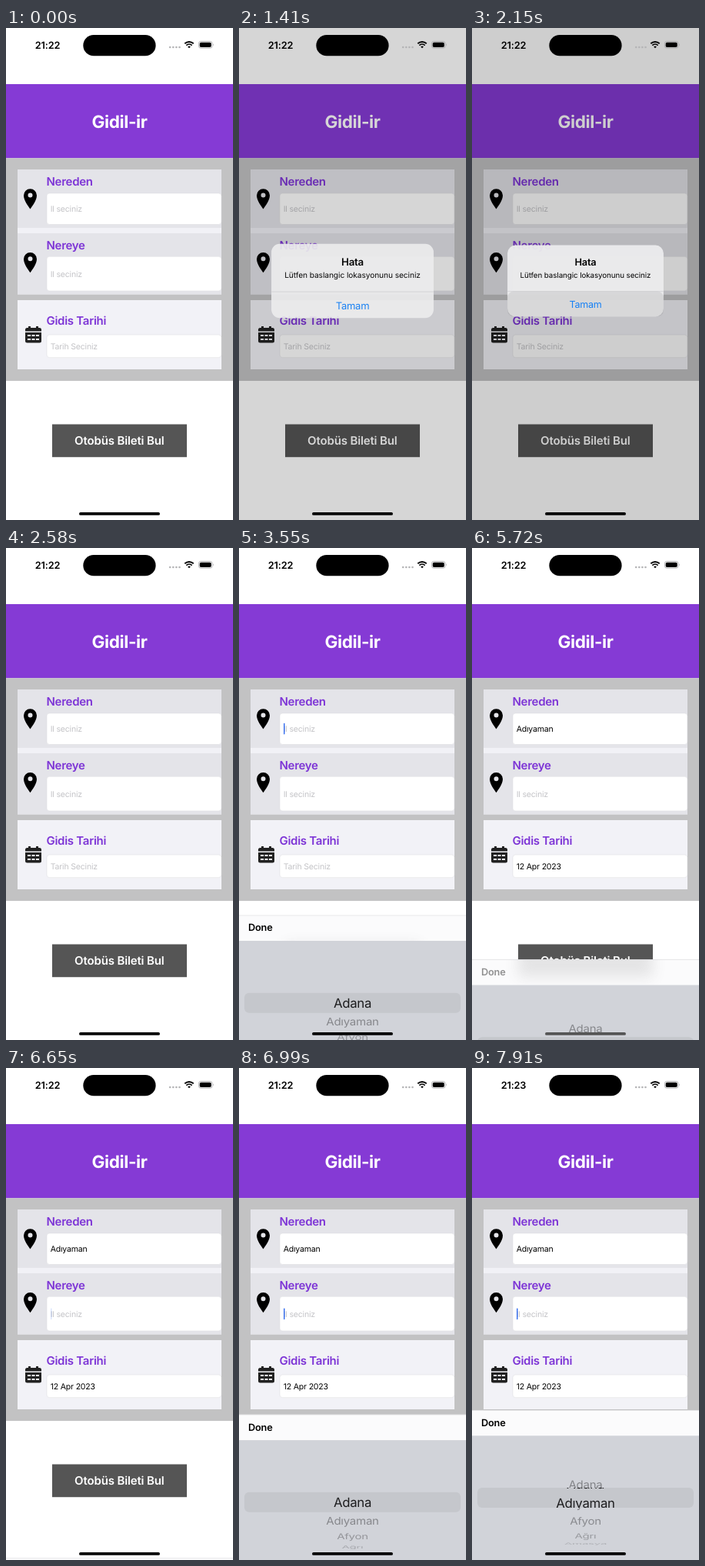
An HTML page that plays this animation: 295x640 px, repeating every 8000 ms.

```html
<!DOCTYPE html>
<html lang="tr">
<head>
<meta charset="utf-8">
<title>Otobüs bileti</title>
<style>
html, body { margin: 0; width: 100%; height: 100%; overflow: hidden; background: #fff; }
svg { display: block; width: 100vw; height: 100vh; }
text { font-family: Inter, "Open Sans", sans-serif; text-rendering: geometricPrecision; white-space: pre; }
.mid { text-anchor: middle; }
.label { font-size: 15px; font-weight: 600; letter-spacing: -.28px; fill: #7d34d6; }
.value { font-size: 10.5px; letter-spacing: -.18px; }
.bar { font-size: 12.75px; font-weight: 600; letter-spacing: -.2px; }
.near { font-size: 16.8px; letter-spacing: -.28px; fill: #1d1d1f; }
.far { font-size: 15px; letter-spacing: -.25px; fill: #1d1d1f; }
</style>
</head>
<body>
<svg viewBox="0 0 295 640">
  <defs>
    <path id="pin" d="M0 13.5C-2.6 9.5-8.5 2.5-8.5-4.3A8.5 8.5 0 0 1 8.5-4.3C8.5 2.5 2.6 9.5 0 13.5ZM0-7.4A3 3 0 1 0 0-1.4A3 3 0 1 0 0-7.4Z"/>
    <clipPath id="inBand"><rect x="0" y="101" width="295" height="26"/></clipPath>
    <clipPath id="offBand"><path d="M0 33H295V101H0ZM0 127H295V195H0Z"/></clipPath>
    <clipPath id="inBar"><rect width="295" height="33"/></clipPath>
    <filter id="soft" x="-30%" y="-60%" width="160%" height="220%"><feGaussianBlur stdDeviation="9"/></filter>
  </defs>

  <rect width="295" height="640" fill="#fff"/>
  <rect y="73" width="295" height="96.3" fill="#853ad5"/>
  <text class="mid" x="147.5" y="129.5" font-size="22.5" font-weight="700" letter-spacing="-.4" fill="#fff">Gidil-ir</text>

  <rect y="169.3" width="295" height="289.7" fill="#c2c2c3"/>
  <rect x="15" y="184" width="265" height="162.5" fill="#f1f1f6"/>
  <rect x="15" y="184" width="265" height="76" fill="#e4e4e9"/>
  <rect x="15" y="267" width="265" height="79.5" fill="#e4e4e9"/>
  <rect x="15" y="354" width="265" height="90" fill="#f2f2f7"/>
  <g fill="#fff" stroke="#dfdfe2" stroke-width=".6">
    <rect x="53" y="215" width="226.8" height="40.5" rx="3.5"/>
    <rect x="53" y="297.3" width="226.8" height="44.7" rx="3.5"/>
    <rect x="53" y="399" width="226.8" height="29.7" rx="3.5"/>
  </g>
  <text class="label" x="52.5" y="205">Nereden</text>
  <text class="label" x="52.5" y="287.7">Nereye</text>
  <text class="label" x="52.5" y="385.5">Gidis Tarihi</text>
  <text class="value" id="from" x="57.7" y="239"></text>
  <text class="value" id="to" x="57.7" y="323.8" fill="#c4c4c7">Il seciniz</text>
  <text class="value" id="date" x="57.7" y="417.8"></text>
  <rect id="caret" x="58" width="1.5" height="14.6" rx=".7" fill="#3c73ef"/>
  <use href="#pin" x="31.5" y="222"/>
  <use href="#pin" x="31.5" y="304.7"/>
  <g fill="#222">
    <path d="M25 394.6V392.5Q25 390 27.5 390H29V388H32V390H39V388H42V390H43.5Q46 390 46 392.5V394.6Z"/>
    <path d="M25 396H46V407Q46 409.5 43.5 409.5H27.5Q25 409.5 25 407Z"/>
    <path d="M28 400H32M33.5 400H37.5M39 400H43M28 405H32M33.5 405H37.5M39 405H43" stroke="#f2f2f7" stroke-width="2"/>
  </g>

  <rect x="60" y="515.5" width="175" height="42.7" fill="#555"/>
  <text class="mid" x="147.3" y="542.4" font-size="15" font-weight="600" letter-spacing="-.15" fill="#fff">Otobüs Bileti Bul</text>

  <g id="panel">
    <rect y="33" width="295" height="170" fill="#d1d3d9"/>
    <rect width="295" height="33.3" fill="#fbfbfc"/>
    <g clip-path="url(#inBar)">
      <rect id="shade" x="60" width="175" height="42.7" fill="#555" opacity=".13" filter="url(#soft)"/>
    </g>
    <rect width="295" height=".6" fill="#d9d9dc"/>
    <text class="bar" id="done" x="12" y="20.8">Done</text>
    <rect x="7" y="101" width="281" height="26" rx="6" fill="#c5c7cc"/>
    <g id="farRows" clip-path="url(#offBand)"></g>
    <g id="nearRows" clip-path="url(#inBand)"></g>
  </g>

  <rect id="dim" width="295" height="640" opacity="0"/>
  <g id="alert">
    <rect x="46.1" y="282.6" width="202.8" height="92.8" rx="10.5" fill="#ececee" opacity=".95"/>
    <rect id="press" x="46.1" y="342.6" width="202.8" height="32.8" rx="8" fill="#000" opacity="0"/>
    <path d="M46.1 342.6H248.9" stroke="#c3c3c6" stroke-width=".5"/>
    <text class="bar mid" x="147.5" y="309.3">Hata</text>
    <text class="mid" x="147.5" y="325" font-size="9.75" letter-spacing="-.06">Lütfen baslangic lokasyonunu seciniz</text>
    <text class="mid" x="147.5" y="364.3" font-size="12.5" letter-spacing="-.25" fill="#1680f5">Tamam</text>
  </g>

  <text class="bar mid" id="clock" x="54" y="26.5"></text>
  <rect x="100.3" y="9" width="94.3" height="27.3" rx="13.65"/>
  <path d="M213.2 25H226" stroke="#b4b4b6" stroke-width="2.6" stroke-linecap="round" stroke-dasharray="0 4.1"/>
  <g fill="none" stroke="#000" stroke-width="1.9">
    <path d="M232.3 20.2A8.3 8.3 0 0 1 243.7 20.2M234.4 22.6A5.2 5.2 0 0 1 241.6 22.6"/>
    <path d="M236.2 24.4A2.6 2.6 0 0 1 239.8 24.4L238 26.3Z" fill="#000" stroke="none"/>
  </g>
  <rect x="250.4" y="17.4" width="17.6" height="8.8" rx="2.8" fill="none" stroke="#a3a3a5" stroke-width=".8"/>
  <rect x="251.7" y="18.7" width="15" height="6.2" rx="1.7"/>
  <path d="M269.2 20.2Q270.6 21.8 269.2 23.4Z" fill="#a3a3a5"/>
  <rect id="home" x="95" y="630" width="105" height="3.8" rx="1.9"/>
</svg>
<script>
const LOOP = 8000;
const CITIES = ["Adana", "Adıyaman", "Afyon", "Ağrı", "Amasya", "Ankara"];
const STEP = 23 * Math.PI / 180, RADIUS = 62, CENTER = 114;
const OPEN_Y = 445, CLOSED_Y = 640;

const $ = id => document.getElementById(id);
const set = (el, attrs) => { for (const k in attrs) el.setAttribute(k, attrs[k]); };
const within = (t, a, b) => t >= a && t < b;

// Critically damped spring from 0 to 1
function spring(t, start, omega) {
  const x = Math.max(0, t - start) / 1000 * omega;
  return 1 - (1 + x) * Math.exp(-x);
}

// Linear track through [time, value] points
function track(t, points) {
  if (t <= points[0][0]) return points[0][1];
  for (let i = 1; i < points.length; i++) {
    const [a, va] = points[i - 1], [b, vb] = points[i];
    if (t < b) return va + (vb - va) * (t - a) / (b - a);
  }
  return points[points.length - 1][1];
}

function makeRows(parent, cls, baseline) {
  return CITIES.map(name => {
    const el = document.createElementNS("http://www.w3.org/2000/svg", "text");
    set(el, { class: cls + " mid", y: baseline });
    el.textContent = name;
    $(parent).append(el);
    return el;
  });
}
const far = makeRows("farRows", "far", 5.4);
const near = makeRows("nearRows", "near", 6);

function drawWheel(pos) {
  CITIES.forEach((_, i) => {
    const angle = (i - pos) * STEP;
    const cos = Math.max(0, Math.cos(angle));
    const y = CENTER + RADIUS * Math.sin(angle);
    const shown = Math.abs(angle) < Math.PI / 2;
    const transform = `translate(147.5 ${y}) scale(1 ${Math.max(cos, .01)})`;
    set(far[i], { transform, opacity: shown ? .1 + .34 * cos : 0 });
    set(near[i], { transform, opacity: shown ? 1 : 0 });
  });
}

function fill(id, text, hint) {
  $(id).textContent = text || hint;
  set($(id), { fill: text ? "#000" : "#c4c4c7" });
}

function draw(t) {
  const filled = t >= 5590;
  fill("from", filled && "Adıyaman", "Il seciniz");
  fill("date", filled && "12 Apr 2023", "Tarih Seciniz");
  $("clock").textContent = t < 7100 ? "21:22" : "21:23";

  // Error dialog
  const shown = spring(t, 1180, 13), gone = spring(t, 2130, 13);
  const visible = t < 2580 ? shown * (1 - gone) : 0;
  const scale = 1 + .2 * (1 - shown);
  set($("dim"), { opacity: .2 * visible });
  set($("alert"), {
    opacity: Math.min(1, visible * 1.2),
    transform: `translate(147.5 329) scale(${scale}) translate(-147.5 -329)`
  });
  set($("press"), { opacity: within(t, 2050, 2200) ? .08 : 0 });

  // City picker
  const lift = t < 6400
    ? spring(t, 3340, 15.3) * (1 - spring(t, 5619, 15.3))
    : spring(t, 6640, 15.3);
  const y = CLOSED_Y + (OPEN_Y - CLOSED_Y) * lift;
  set($("panel"), { transform: `translate(0 ${y})`, visibility: lift > .001 ? "visible" : "hidden" });
  set($("shade"), { y: 515.5 - y });
  set($("done"), { opacity: within(t, 5480, 6400) ? .42 : 1 });
  set($("home"), { fill: within(t, 5650, 5900) ? "#555" : "#000" });
  drawWheel(t < 6400
    ? track(t, [[4405, 0], [4420, .84], [4540, .92], [4760, .98], [4960, 1]])
    : track(t, [[7535, 0], [7550, .2], [7660, .48], [7900, .5], [7910, .71], [8000, .73]]));

  // Text caret
  const blink = t < 6400
    ? track(t, [[3320, 0], [3400, 1], [4400, 1], [4420, .55], [4540, 0], [4840, 0], [4960, 1], [5585, 1], [5590, 0]])
    : track(t, [[6640, 0], [6700, 1]]);
  set($("caret"), { y: t < 6400 ? 227.8 : 312.6, opacity: blink });
}

const start = performance.now();
function tick() {
  draw((performance.now() - start) % LOOP);
  requestAnimationFrame(tick);
}
tick();
</script>
</body>
</html>
```
